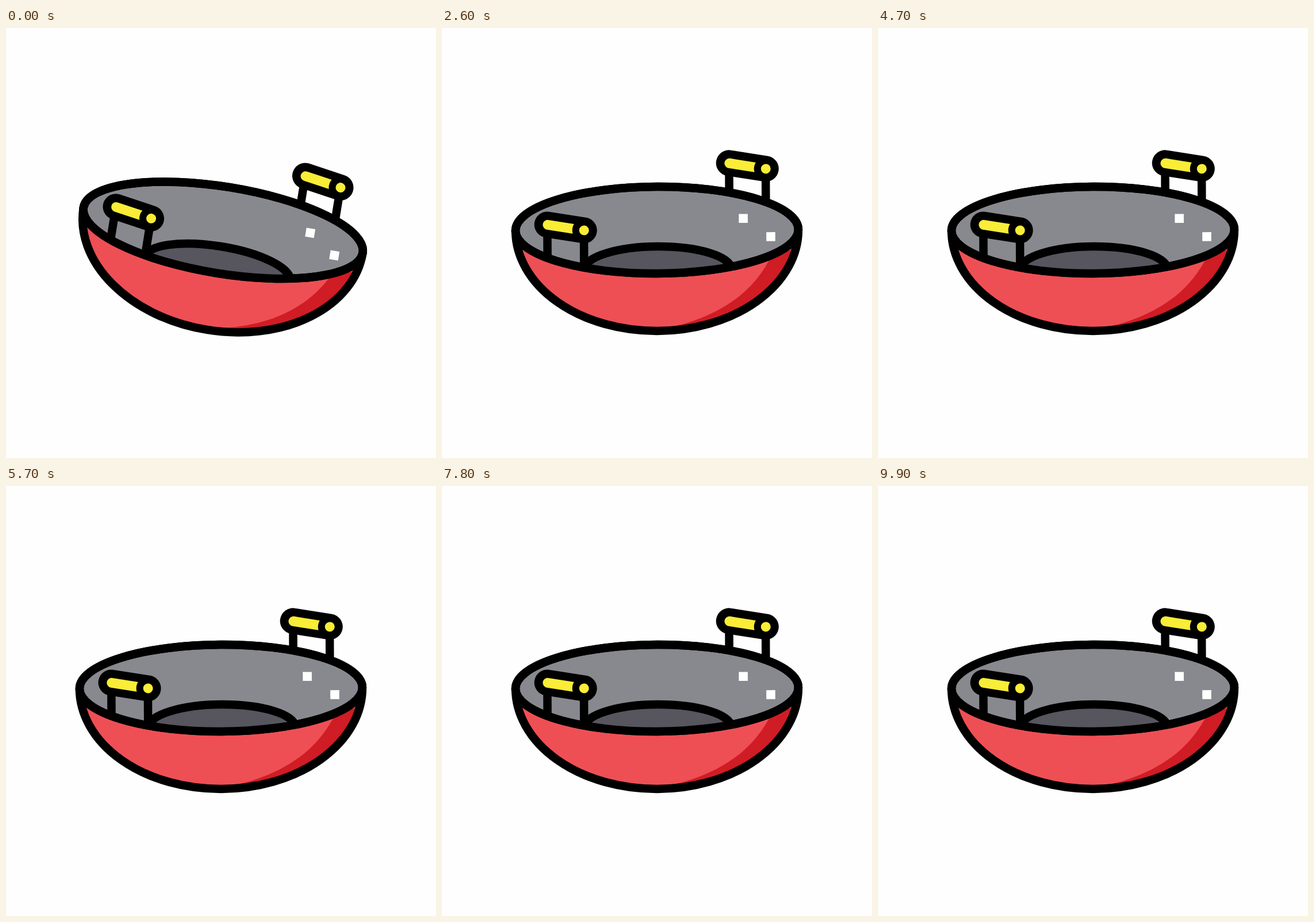
These frames come from a looping animation (748x748 px, 10000 ms). An HTML page:

```html
<!DOCTYPE html>
<html lang="en">
<head>
<meta charset="utf-8">
<title>Rocking wok</title>
<style>
  html, body { margin: 0; width: 100%; height: 100%; overflow: hidden; background: #fefefe; }
  svg { display: block; width: 100%; height: 100%; }
</style>
</head>
<body>
<svg viewBox="0 0 748 748">
  <defs>
    <clipPath id="bowlClip"><path d="M128 351.5a246 175.5 0 0 0 492 0z"/></clipPath>
    <clipPath id="rimClip"><ellipse cx="374" cy="351.5" rx="246" ry="75.5"/></clipPath>
    <g id="handle" fill="none" stroke="#000">
      <path d="M500 240V290M563.6 245V306" stroke-width="14.5"/>
      <path d="M499.8 235.4L563.8 245.7" stroke-width="45" stroke-linecap="round"/>
      <path d="M500.5 235.8L550 243.8" stroke="#f9ed37" stroke-width="17" stroke-linecap="round"/>
      <circle cx="563.8" cy="245.7" r="14.5" fill="#f9ed37" stroke-width="12"/>
    </g>
  </defs>
  <g id="wok" stroke="#000" stroke-width="14.5">
    <g clip-path="url(#bowlClip)" stroke="none">
      <path d="M110 340H640V540H110z" fill="#ee4f54"/>
      <path d="M574 395Q528 490 404 519V540H640V380z" fill="#d01c24"/>
    </g>
    <path d="M128 351.5a246 175.5 0 0 0 492 0" fill="none"/>
    <ellipse cx="374" cy="351.5" rx="246" ry="75.5" fill="#88898e"/>
    <g clip-path="url(#rimClip)">
      <ellipse cx="375" cy="420" rx="128" ry="40" fill="#57555e"/>
    </g>
    <ellipse cx="374" cy="351.5" rx="246" ry="75.5" fill="none"/>
    <path d="M516.5 324.1h15.6v15.6h-15.6zM564.2 356h15.6v15.6h-15.6z" fill="#fff" stroke="none"/>
    <use href="#handle"/>
    <use href="#handle" x="-316.6" y="105.7"/>
  </g>
</svg>
<script>
  const wok = document.getElementById('wok');
  const LOOP = 10000, STEP = 100, SWING = 9.45, LEAN = -0.25;
  const start = performance.now();

  // A swing takes 20 steps; both of its end poses are shown, so it repeats every 21.
  function draw(now) {
    const time = Math.max(0, now - start) % LOOP;
    const step = Math.floor(time / STEP) % 21;
    const angle = LEAN + SWING * Math.cos(step / 20 * 2 * Math.PI);
    wok.setAttribute('transform', `rotate(${angle} 374.5 374.5)`);
    requestAnimationFrame(draw);
  }
  draw(start);
</script>
</body>
</html>
```
